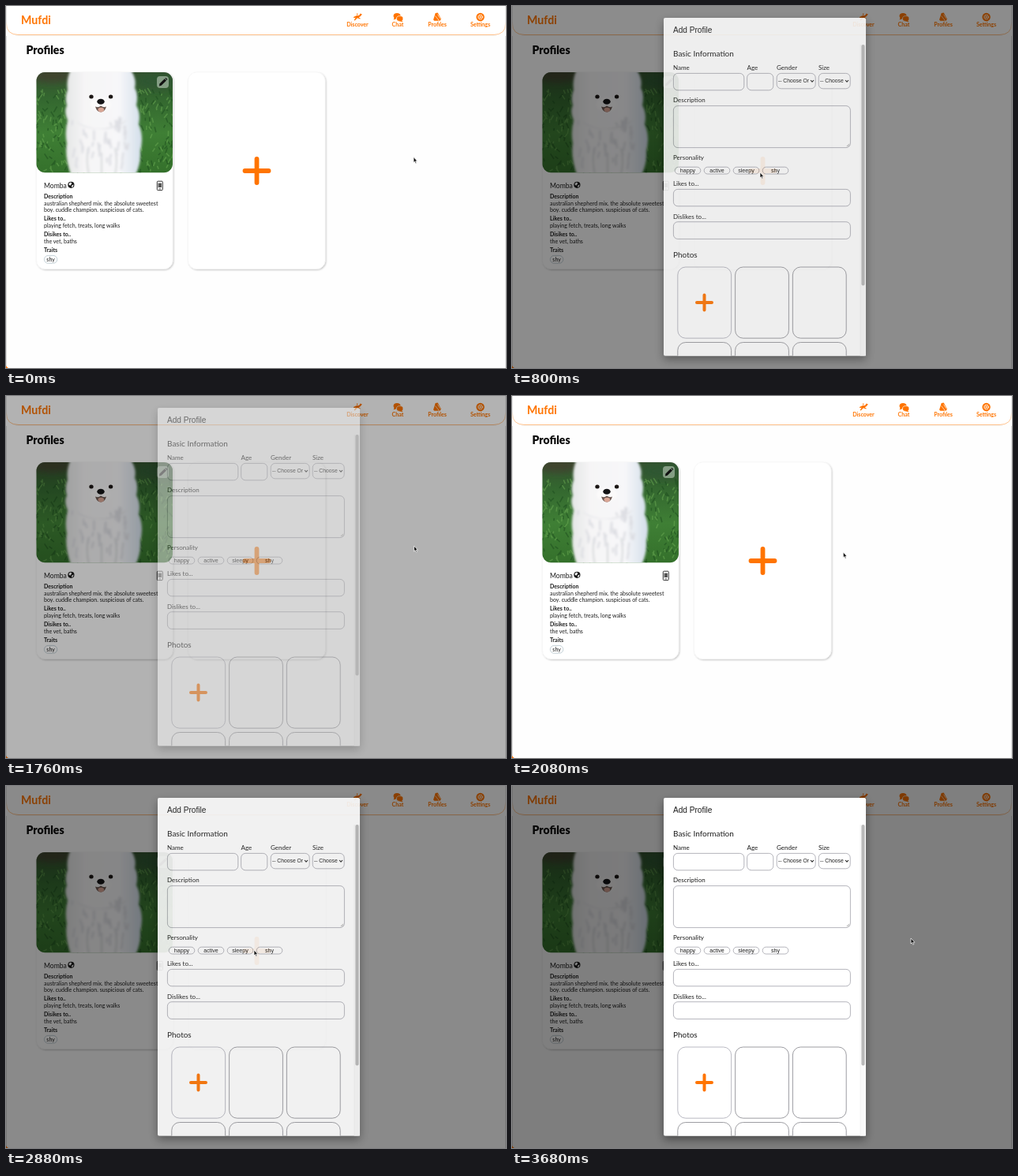
An HTML page that plays this animation: 633x459 px, repeating every 3.76 s.

```html
<!DOCTYPE html>
<html lang="en">
<head>
<meta charset="utf-8">
<title>Profiles</title>
<style>
html, body { margin: 0; width: 100%; height: 100%; overflow: hidden; background: #fff; }
svg { display: block; width: 633px; height: 459px; }
text { font-family: Lato, sans-serif; fill: #1c1c1c; white-space: pre; }
.ui { font-family: "Liberation Sans", Arial, sans-serif; }
.b { font-weight: 700; }
.h { font-weight: 900; fill: #0a0a0a; }
.o { fill: #ff7400; }
.mid { text-anchor: middle; }
</style>
</head>
<body>
<svg id="stage" viewBox="0 0 633 459" xmlns="http://www.w3.org/2000/svg">
  <defs>
    <linearGradient id="grass" x1="0" y1="0" x2="0" y2="1">
      <stop offset="0" stop-color="#35502f"/>
      <stop offset=".25" stop-color="#33662f"/>
      <stop offset=".6" stop-color="#3f7f35"/>
      <stop offset="1" stop-color="#34702b"/>
    </linearGradient>
    <linearGradient id="fur" x1="0" y1="0" x2="1" y2="0">
      <stop offset="0" stop-color="#e4e6e6"/>
      <stop offset=".25" stop-color="#f6f5f6"/>
      <stop offset=".7" stop-color="#f7f7f9"/>
      <stop offset="1" stop-color="#d3deea"/>
    </linearGradient>
    <linearGradient id="rim" gradientUnits="userSpaceOnUse" x1="0" y1="20" x2="0" y2="37">
      <stop offset="0" stop-color="#ddd"/>
      <stop offset=".5" stop-color="#ffc48e"/>
      <stop offset="1" stop-color="#ffae68"/>
    </linearGradient>
    <filter id="soft" x="-20%" y="-20%" width="140%" height="140%"><feGaussianBlur stdDeviation="1.5"/></filter>
    <filter id="blur" x="-50%" y="-50%" width="200%" height="200%"><feGaussianBlur stdDeviation=".6"/></filter>
    <filter id="wide" x="-50%" y="-50%" width="200%" height="200%"><feGaussianBlur stdDeviation="5"/></filter>
    <filter id="lift" x="-10%" y="-10%" width="125%" height="125%">
      <feDropShadow dx="1" dy="1" stdDeviation=".8" flood-color="#000" flood-opacity=".24"/>
    </filter>
    <filter id="float" x="-15%" y="-10%" width="130%" height="125%">
      <feDropShadow dx="0" dy="5" stdDeviation="6" flood-color="#000" flood-opacity=".4"/>
    </filter>
    <clipPath id="photoClip"><rect x="38.5" y="84" width="172.5" height="127.3" rx="11"/></clipPath>
    <clipPath id="formClip"><rect x="192" y="40" width="256" height="403.5"/></clipPath>
  </defs>
  <rect width="633" height="459" fill="#fefefe"/>
  <g id="page"></g>
  <rect id="shade" width="633" height="459"/>
  <g id="modal"></g>
  <path id="cursor" d="M0 0V7L1.5 5.6L2.6 8.2L3.8 7.6L2.7 5.2H4.8Z" fill="#111" stroke="#fff" stroke-width=".7" stroke-linejoin="round"/>
</svg>
<script>
const $ = id => document.getElementById(id);
const LOOP = 3760, STEP = 80;

const text = (x, y, size, str, cls = '') =>
  `<text x="${x}" y="${y}" font-size="${size}" class="${cls}">${str}</text>`;
const box = (x, y, w, h, r, extra = 'fill="#fff" stroke="#a3a3ab" stroke-width=".8"') =>
  `<rect x="${x}" y="${y}" width="${w}" height="${h}" rx="${r}" ${extra}/>`;
const plus = (x, y, arm, weight) =>
  `<path d="M${x - arm} ${y}h${2 * arm}M${x} ${y - arm}v${2 * arm}" stroke="#ff7400" stroke-width="${weight}" stroke-linecap="round"/>`;
const oval = (x, y, rx, ry, fill) =>
  `<ellipse cx="${x}" cy="${y}" rx="${rx}" ry="${ry}" fill="${fill}"/>`;

// Small seeded generator for grass and fur strokes
function random(seed) {
  return () => (seed = seed * 16807 % 2147483647) / 2147483647;
}

function strokes(seed, count, [x, y, w, h], lean, length) {
  const rnd = random(seed);
  let d = '';
  for (let i = 0; i < count; i++) {
    const px = x + rnd() * w, py = y + rnd() * h;
    d += `M${px.toFixed(1)} ${py.toFixed(1)}l${((rnd() - .5) * lean).toFixed(1)} ${(length * (.5 + rnd())).toFixed(1)}`;
  }
  return d;
}

function photo() {
  const lawn = [36, 104, 178, 104], coat = [84, 140, 72, 62];
  return `<g clip-path="url(#photoClip)">
    <rect x="38" y="84" width="174" height="128" fill="url(#grass)"/>
    <g filter="url(#wide)">${oval(58, 88, 26, 8, '#40432f')}${oval(190, 95, 26, 10, '#2d5632')}</g>
    <g filter="url(#blur)" stroke-width="1.6" opacity=".5">
      <path d="${strokes(77, 190, lawn, 9, 5)}" stroke="#1b4a1d"/>
      <path d="${strokes(913, 190, lawn, 9, 5)}" stroke="#6cab54"/>
    </g>
    <g filter="url(#soft)">
      <path d="M82 80Q76 94 78 106Q74 116 77 126Q73 134 78 145Q74 160 77 174Q74 190 82 214H164Q171 200 170 184Q175 166 168 150Q171 136 165 126Q168 112 163 104Q166 92 157 80Z" fill="url(#fur)"/>
      <path d="M88 146Q118 166 154 144Q142 157 119 156Q98 156 88 146Z" fill="#dfe0e4"/>
      <path d="M104 180Q101 196 105 214M138 180Q142 196 138 214M121 186V214" fill="none" stroke="#d6d9da" stroke-width="2"/>
      <path d="${strokes(31, 45, coat, 5, 9)}" stroke="#dcdde2" stroke-width="2.4"/>
      ${oval(120, 125, 13, 9, '#fbfafa')}
    </g>
    <g filter="url(#blur)">
      ${oval(108, 115, 2.7, 2.5, '#1b1614')}${oval(132.6, 115, 2.7, 2.5, '#1b1614')}
      ${oval(120, 121.3, 4.7, 3.5, '#141416')}
      <path d="M113 127.5Q117 129.5 120 126.5Q124 129.5 127 127.5Q125 134.5 120 134.5Q115 134.5 113 127.5Z" fill="#6d5a53"/>
      ${oval(120.3, 131.6, 3.8, 2.8, '#d9a695')}
    </g>
  </g>`;
}

function navIcons() {
  return `<g class="o">
    <path d="M440 14L444 12L447 12L448.6 9.4L450.8 10.4L448.8 13L446.6 14.4L448.8 15.8L448.2 16.6L444.8 15.2L441.6 18.6L440.6 17.9L442.6 14.8L440 15Z"/>
    <circle cx="444.6" cy="10.4" r=".8"/>
    <ellipse cx="495" cy="12.6" rx="4.5" ry="3.7"/><path d="M491.8 14L490.6 17.5L494.8 16Z"/>
    <ellipse cx="498.6" cy="16" rx="4.2" ry="3.4" stroke="#fff" stroke-width=".7"/><path d="M500.5 17.8L502.5 20.2L497.5 19Z"/>
    <path d="M543.6 9L546.6 8.4L550.8 16.2L549.6 18.8H542.2L541 17.6Z"/>
    <path d="M543.4 12.5L548.4 18.6M546.4 10.6L549.6 15.8" stroke="#fff" stroke-width=".7"/>
    <circle cx="600.5" cy="14" r="5.2"/></g>
    <circle cx="600.5" cy="14" r="2.6" fill="#ff7400" stroke="#fff" stroke-width="1.3" stroke-dasharray="1.5 .55"/>
    <circle cx="600.5" cy="14" r="1" fill="#fff"/>`;
}

function cardIcons() {
  return `<rect x="191" y="89" width="15" height="15" rx="4" fill="#cbd8c8" opacity=".55"/>
    <path d="M193.8 101.4L194.5 98.6L200.8 92.3L203 94.5L196.7 100.8Z" fill="#111"/>
    <path d="M201.4 91.7L202.3 90.9L204.4 93L203.6 93.9Z" fill="#111"/>
    <circle cx="82.4" cy="226.8" r="4.1" fill="#1a1a1a"/>
    <path d="M79.6 225L81.8 223.6L83.4 224.8L81.6 227.6L79.8 227ZM83.4 227.4L85.4 226.4L85 229L83 230Z" fill="#fff"/>
    <rect x="191.3" y="222.2" width="7" height="11.4" rx="1" fill="#fff" stroke="#333" stroke-width="1"/>
    <rect x="192.6" y="224.6" width="4.4" height="5.4" fill="#555"/>
    <path d="M193.6 231.8h2.4" stroke="#333" stroke-width=".8"/>`;
}

function buildPage() {
  const nav = [[445, 'Discover'], [496, 'Chat'], [546, 'Profiles'], [600.5, 'Settings']];
  const notes = [
    [244, 'Description', 'b'],
    [252.7, 'australian shepherd mix. the absolute sweetest'],
    [261, 'boy. cuddle champion. suspicious of cats.'],
    [272.3, 'Likes to..', 'b'],
    [281, 'playing fetch, treats, long walks'],
    [292.3, 'Disikes to..', 'b'],
    [301, 'the vet, baths'],
    [312.3, 'Traits', 'b']
  ];
  const card = 'fill="#fff" stroke="#f0f0f0" stroke-width=".5" filter="url(#lift)"';
  $('page').innerHTML =
    `<path d="M.5 38V459M632.5 38V459" stroke="#dcdcdc"/>
    <path d="M0 456Q1 458 3 459H0Z" fill="#ff7400"/>
    <path d="M.5 -5V22Q.5 36.5 16 36.5H617Q632.5 36.5 632.5 22V-5Z" fill="#fff" stroke="url(#rim)" stroke-width=".8"/>
    <path d="M12 37.5H621" stroke="#ddd" stroke-width=".6" opacity=".6"/>`
    + text(19, 23, 14.2, 'Mufdi', 'b o')
    + navIcons()
    + nav.map(([x, s]) => text(x, 26.4, 7.05, s, 'b o mid')).join('')
    + text(25.5, 61, 14, 'Profiles', 'h')
    + box(38.5, 84, 172.5, 249.5, 11, card)
    + photo() + cardIcons()
    + text(48, 231, 8.6, 'Momba')
    + notes.map(([y, s, c]) => text(48, y, 7.05, s, c)).join('')
    + box(48.4, 316.4, 16.4, 9.8, 4.9, 'fill="#fff" stroke="#a9bcc5" stroke-width=".7"')
    + text(56.6, 323.5, 7, 'shy', 'mid')
    + box(230.5, 84, 173.5, 249.5, 11, card)
    + plus(317.5, 209, 15, 5.8);
}

function buildModal() {
  const labels = [[204, 81, 'Name'], [297.5, 81, 'Age'], [335, 81, 'Gender'], [388, 81, 'Size'],
    [204, 122.3, 'Description'], [204, 194.8, 'Personality'], [204, 228, 'Likes to...'], [204, 269.6, 'Dislikes to...']];
  const fields = [[204.4, 85.4, 89.4, 21.4], [297.6, 85.4, 33.2, 21.4], [335.2, 85.4, 49, 19.4], [388.2, 85.4, 40, 19.4],
    [204.4, 126.6, 224, 53], [204.4, 232.4, 224, 21.4], [204.4, 273.7, 224, 21.7]];
  const chips = ['happy', 'active', 'sleepy', 'shy'];
  const arrow = x => `<path d="M${x - 2} 94l2 2.2l2-2.2" fill="none" stroke="#222" stroke-width="1.1"/>`;
  let tiles = '';
  for (let i = 0; i < 6; i++) {
    const x = 209.8 + i % 3 * 72.8, y = i < 3 ? 331 : 426.5;
    tiles += box(x, y, 67.8, 90.2, 10, `fill="#fff" stroke="${i ? '#85858b' : '#a9a9b4'}" stroke-width=".8"`);
  }
  $('modal').innerHTML =
    box(192, 15, 256, 428.5, 2, 'fill="#fff" filter="url(#float)"')
    + text(204, 34.4, 10.1, 'Add Profile', 'ui')
    + `<g clip-path="url(#formClip)">
      <rect x="441" y="49" width="7" height="395" fill="#fafafa"/>
      <path d="M441 49V444" stroke="#ececec" stroke-width=".6"/>`
    + box(442.4, 49, 4.2, 305.5, 2.1, 'fill="#b9b9b9"')
    + text(204, 63.8, 10, 'Basic Information')
    + labels.map(([x, y, s]) => text(x, y, 8, s)).join('')
    + fields.map(f => box(...f, 5.5)).join('')
    + text(337, 97.4, 6.75, '-- Choose Or', 'ui') + arrow(380)
    + text(390, 97.4, 6.75, '-- Choose', 'ui') + arrow(424)
    + '<path d="M423.8 178L427 174.8M425.6 178L427 176.6" stroke="#777" stroke-width=".6"/>'
    + chips.map((s, i) => box(206.2 + 37 * i, 204.2, 32.6, 8.8, 4.4)
      + text(222.5 + 37 * i, 211, 7.1, s, 'ui mid')).join('')
    + text(204, 319.3, 10, 'Photos')
    + tiles + plus(243.5, 376, 9.5, 4) + '</g>';
}

const linear = u => u;
const smooth = u => u * u * (3 - 2 * u);
const easeIn = u => u ** 1.6;
const easeOut = u => 1 - (1 - u) ** 1.6;

// Each key: time, values..., easing used to reach it
const pointer = [
  [0, 516, 191.5, linear], [560, 314, 211, smooth], [880, 314, 211, linear],
  [1200, 471, 198, easeIn], [1440, 516.5, 190, easeOut], [1840, 516.5, 190, linear],
  [2080, 419.3, 198, easeIn], [2320, 314, 208, easeOut],
  [3360, 314, 208, linear], [3680, 505, 193, smooth], [LOOP, 505, 193, linear]
];
const dim = [
  [0, 0, linear], [640, 0, linear], [720, .5, linear], [800, .9, linear], [880, 1, linear],
  [1600, 1, linear], [1680, .92, linear], [1760, .6, linear], [1840, .14, linear], [1920, 0, linear],
  [2640, 0, linear], [2720, .15, linear], [2800, .6, linear], [2880, .92, linear], [2960, 1, linear], [LOOP, 1, linear]
];

function sample(keys, t) {
  const i = keys.findIndex(k => k[0] > t);
  const a = keys[i - 1], b = keys[i], ease = b[b.length - 1];
  const u = ease((t - a[0]) / (b[0] - a[0]));
  return a.slice(1, -1).map((v, n) => v + (b[n + 1] - v) * u);
}

function draw(ms) {
  const t = Math.floor(ms % LOOP / STEP) * STEP;
  const [x, y] = sample(pointer, t);
  const [d] = sample(dim, t);
  $('shade').setAttribute('opacity', d * .5);
  $('modal').setAttribute('opacity', d ** 1.5);
  $('cursor').setAttribute('transform', `translate(${x.toFixed(1)} ${y.toFixed(1)})`);
}

buildPage();
buildModal();
const start = performance.now();
function tick(now) {
  draw(Math.max(0, now - start));
  requestAnimationFrame(tick);
}
draw(0);
requestAnimationFrame(tick);
</script>
</body>
</html>
```
